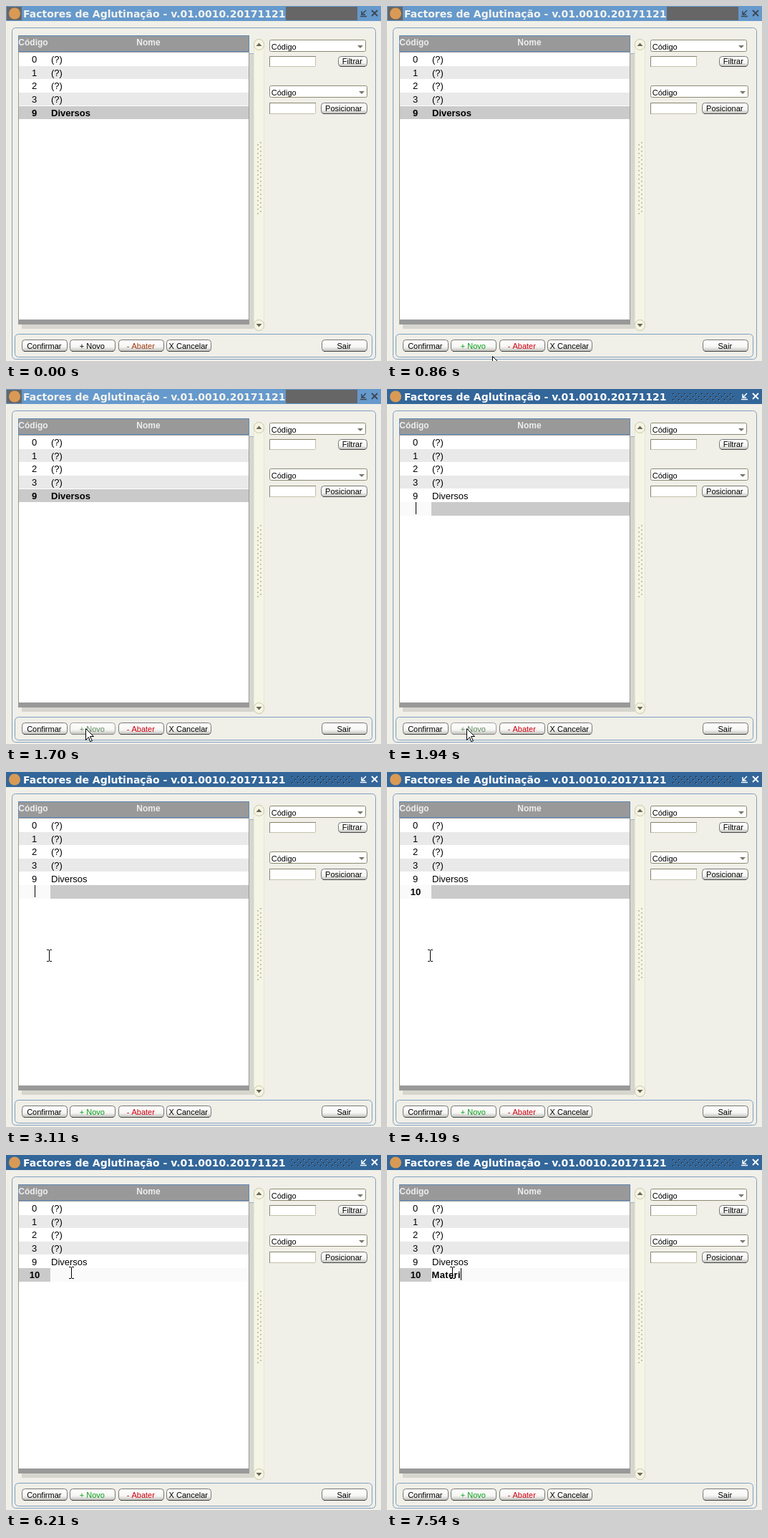
Write an HTML page with a canvas that moves like this. It is 524 by 496 pixels and loops after 8 s.

```html
<!DOCTYPE html>
<html lang="pt">
<head>
<meta charset="utf-8">
<style>
html, body { margin: 0; width: 100%; height: 100%; overflow: hidden; background: #f0efe8; }
canvas { display: block; }
</style>
</head>
<body>
<canvas id="stage" width="524" height="496"></canvas>
<script>
const c = document.getElementById('stage').getContext('2d');
const LOOP = 8000;
const SANS = '"Liberation Sans", Arial, sans-serif';
const TITLE = '"DejaVu Sans", Verdana, sans-serif';
const GREY = '#cacaca', PALE = '#fafafa';

// Times of the main events, in ms
const ENTER = 860, ACTIVE = 1870, NEW_ROW = 1940, LEAVE = 2340;
const DIGITS = [3410, 3580], RETURN = 4820, SETTLE = 5520, NAME_EDIT = 5670;
const LETTERS = [6680, 6840, 7140, 7220, 7450, 7540];
const CARET_ON = [[NEW_ROW, 2495], [3110, 4190], [RETURN, 5370], [NAME_EDIT, 6210], [6680, LOOP]];

const rows = [['0', '(?)'], ['1', '(?)'], ['2', '(?)'], ['3', '(?)'], ['9', 'Diversos']];
const rowTop = i => Math.round(65 + i * 18.65);
const passed = (times, t) => times.filter(x => t >= x).length;

function rect(x, y, w, h, fill) {
  c.fillStyle = fill;
  c.fillRect(x, y, w, h);
}

function box(x, y, w, h, r, fill, stroke) {
  c.beginPath();
  c.roundRect(x + .5, y + .5, w - 1, h - 1, r);
  if (fill) { c.fillStyle = fill; c.fill(); }
  c.strokeStyle = stroke;
  c.lineWidth = 1;
  c.stroke();
}

function text(s, x, y, size, { bold, align = 'left', color = '#000', font = SANS } = {}) {
  c.font = `${bold ? 'bold ' : ''}${size}px ${font}`;
  c.textAlign = align;
  c.fillStyle = color;
  c.fillText(s, x, y);
}

function shape(points, fill, stroke) {
  c.beginPath();
  points.forEach(([x, y]) => c.lineTo(x, y));
  c.closePath();
  c.fillStyle = fill;
  c.fill();
  if (stroke) { c.strokeStyle = stroke; c.lineWidth = 1; c.stroke(); }
}

function lines(color, width, ...paths) {
  c.strokeStyle = color;
  c.lineWidth = width;
  c.beginPath();
  for (const [x, y, ...rest] of paths) {
    c.moveTo(x, y);
    for (let i = 0; i < rest.length; i += 2) c.lineTo(rest[i], rest[i + 1]);
  }
  c.stroke();
}

function button(label, x, y, w, h, color = '#000', hover = false) {
  const g = c.createLinearGradient(0, y, 0, y + h);
  g.addColorStop(0, '#fff');
  g.addColorStop(.6, '#f6f6f4');
  g.addColorStop(1, '#b8b8b4');
  box(x, y, w, h, 4, g, hover ? '#a0a0a0' : '#777');
  lines(hover ? '#888' : '#444', 1, [x + 3, y + h - .5, x + w - 3, y + h - .5]);
  text(label, x + w / 2 - .7, y + h - 4, 11, { align: 'center', color });
}

function combo(x, y, w) {
  box(x, y, w, 17, 2, '#fff', '#8c8a70');
  const ax = x + w - 8, ay = y + 8;
  shape([[ax - 4, ay], [ax + 4, ay], [ax, ay + 4]], '#77776a');
  text('Código', x + 2.8, y + 14, 11);
}

function field(x, y, w, h) {
  box(x, y, w, h, 1, '#fff', '#c4c2a8');
  lines('#85836c', 1, [x + .5, y + h, x + .5, y + .5, x + w, y + .5]);
}

function titleBar(active) {
  rect(0, 0, 524, 21, active ? '#336699' : '#6699cc');
  if (!active) {
    rect(1, 1, 21, 19, '#666');
    rect(391, 1, 100, 19, '#666');
  }
  c.beginPath();
  c.arc(12, 10.5, 8, 0, 7);
  c.fillStyle = '#d99a55';
  c.fill();
  text('Factores de Aglutinação - v.01.0010.20171121', 24, 16, 14,
    { bold: true, font: TITLE, color: active ? '#fff' : '#f4f4ee' });
  if (active) {
    for (let j = 0; j < 3; j++) {
      for (let x = 399 + j % 2 * 4; x < 484; x += 8) {
        rect(x, 6 + j * 4, 2, 2, '#20303f');
        rect(x + 1, 7 + j * 4, 1, 1, '#8fb0cc');
      }
    }
  }
  const ink = active ? '#fff' : '#3c4650';
  lines(ink, 1.5, [503, 6, 497, 12], [497, 7, 497, 12, 502, 12], [495, 14.5, 504, 14.5]);
  lines(ink, 1.8, [511, 6, 519, 14], [519, 6, 511, 14]);
}

function scrollBar() {
  box(346, 46, 15, 408, 7, '#f5f5e6', '#e6e6d4');
  for (const [y, d] of [[54, -1], [446, 1]]) {
    box(346, y - 8, 15, 16, 7, '#f6f5e4', '#c8c8a8');
    shape([[349.5, y - 2 * d], [357.5, y - 2 * d], [353.5, y + 2.5 * d]], '#666658');
  }
  for (let y = 190; y < 288; y += 6) {
    rect(355, y, 2, 2, '#c6c4a8');
    rect(351, y + 3, 2, 2, '#c6c4a8');
  }
}

function caret(x, y) { rect(x, y, 1, 17, '#000'); }

function table(t) {
  rect(340, 66, 6, 385, '#d6d6cf');
  rect(22, 445, 324, 6, '#d6d6cf');
  rect(17, 41, 323, 404, '#999');
  rect(18, 65, 321, 373, '#fff');
  box(17, 41, 323, 23, 0, null, '#5f88b4');
  rect(340, 66, 6, 1, '#9fb2c4');
  const head = { bold: true, align: 'center', color: '#eee' };
  text('Código', 38, 55, 12, head);
  text('Nome', 199, 55, 12, head);

  const added = t >= NEW_ROW;
  rows.forEach(([code, name], i) => {
    const y = rowTop(i), bold = i === 4 && !added;
    if (bold) rect(18, y, 321, 18, GREY);
    else if (i % 2) rect(18, y, 321, 18, '#e9e9e9');
    text(code, 39.5, y + 14, 13, { bold, align: 'center' });
    text(name, 63, y + 14, 13, { bold });
  });
  if (!added) return;

  const y = rowTop(5), naming = t >= NAME_EDIT;
  rect(18, y, 44, 19, naming ? GREY : t >= RETURN ? '#fff' : PALE);
  rect(62, y, 277, 19, naming ? PALE : GREY);
  const code = '10'.slice(0, passed(DIGITS, t));
  text(code, 40, y + 14, 13, { bold: true, align: 'center' });
  let x = [40, 43, 47][code.length];
  if (naming) {
    const name = 'Materi'.slice(0, passed(LETTERS, t));
    c.letterSpacing = '.35px';
    text(name, 62.5, y + 14, 13, { bold: true });
    x = Math.round(62.6 + c.measureText(name).width);
    c.letterSpacing = '0px';
  }
  if (CARET_ON.some(([a, b]) => t >= a && t < b)) caret(x, y);
}

// Pointer moves in discrete steps, as captured on screen
function step(t, start, gap, n) {
  return Math.max(0, Math.min(n, Math.floor((t - start) / gap) + 1)) / n;
}
const mix = (a, b, k) => a.map((v, i) => Math.round(v + (b[i] - v) * k));

function pointerAt(t) {
  const confirm = [83, 473], add = [111, 474], idle = [60, 256];
  if (t < ENTER) return null;
  if (t < 1320) return mix([160, 492], confirm, step(t, ENTER, 76, 6));
  if (t < 1700) return mix(confirm, [111, 476], step(t, 1320, 77.5, 5));
  if (t < RETURN) return mix(add, idle, step(t, LEAVE, 77.5, 5));
  if (t < SETTLE) return mix(idle, [92, 161], step(t, RETURN, 75, 5));
  return [91, 164];
}

function pointer([x, y]) {
  if (y > 440) {
    const arrow = [[0, 0], [0, 16], [4, 12], [6, 18], [9, 17], [6, 11], [11, 11]];
    shape(arrow.map(([a, b]) => [x + a + .5, y + b + .5]), '#fff', '#000');
  } else {
    rect(x, y - 7, 1, 15, '#000');
    for (const e of [y - 8, y + 8]) {
      rect(x - 3, e, 3, 1, '#000');
      rect(x + 1, e, 3, 1, '#000');
    }
  }
}

function buttons(t, p) {
  const over = (x, w) => !!p && p[0] >= x && p[0] < x + w && p[1] >= 466 && p[1] < 484;
  const early = t < ENTER;
  const item = (label, x, w, color, hot, hover = over(x, w)) =>
    button(label, x, 466, w, 17, hover ? hot : color, hover);
  item('Confirmar', 22, 64, '#000', '#666');
  item('+ Novo', 89, 64, early ? '#000' : '#08a018', '#5c8a5c');
  item('- Abater', 157, 64, early ? '#a03a10' : '#d00010', '#b03a18');
  item('X Cancelar', 224, 63, '#000', '#666');
  item('Sair', 441, 64, '#000', '#666');
}

function draw(t) {
  const p = pointerAt(t);
  rect(0, 0, 524, 496, '#f0efe8');
  titleBar(t >= ACTIVE);
  rect(0, 21, 1, 475, '#f8f5e0');
  box(8, 30, 509, 464, 5, null, '#7f9fc0');
  box(12, 458, 500, 33, 5, null, '#7f9fc0');
  table(t);
  scrollBar();
  combo(368, 47, 135);
  field(368, 70, 65, 15);
  button('Filtrar', 464, 70, 41, 15);
  combo(368, 111, 137);
  field(368, 135, 65, 16);
  button('Posicionar', 440, 135, 65, 16);
  buttons(t, p);
  if (p) pointer(p);
}

const t0 = performance.now();
function frame() {
  draw((performance.now() - t0) % LOOP);
  requestAnimationFrame(frame);
}
frame();
</script>
</body>
</html>
```
